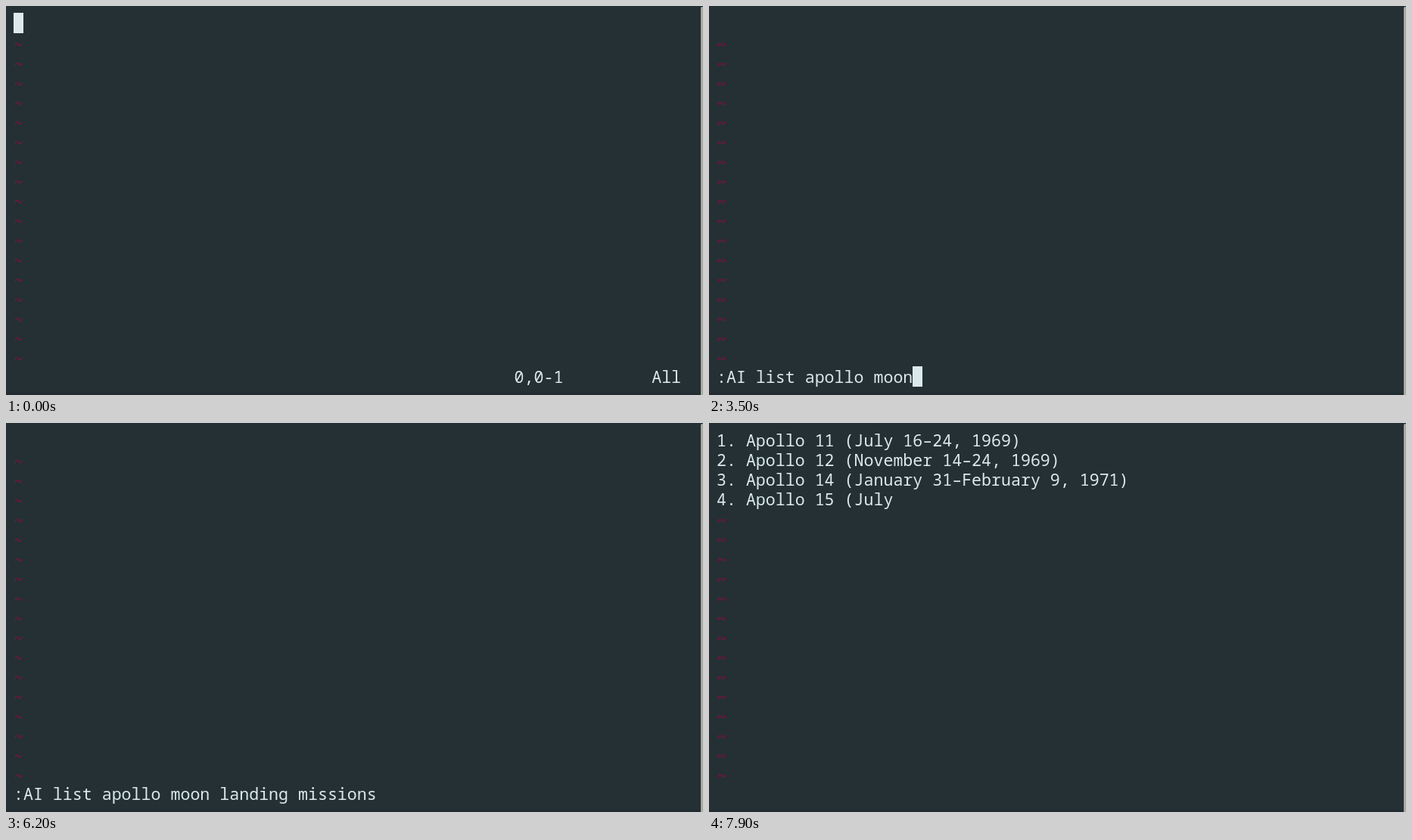
An HTML page that plays this animation: 921 by 515 pixels, repeating every 8 s.

```html
<!DOCTYPE html>
<html lang="en">
<head>
<meta charset="utf-8">
<title>Terminal editor</title>
<style>
  html, body { margin: 0; width: 100%; height: 100%; overflow: hidden; background: #243034; }
  #stage {
    position: absolute; left: 0; top: 0; width: 921px; height: 515px;
    overflow: hidden; background: #243034; color: #dbe9ef;
    font: 500 21.62px/28px "Noto Sans Mono", "DejaVu Sans Mono", monospace;
    font-variant-ligatures: none;
  }
  #stage div { position: absolute; white-space: pre; height: 26px; }
  #stage .tilde { color: #7c1241; line-height: 33px; }
  #stage #cursor { width: 13px; height: 27px; background: #dbe9ef; }
  #stage #edge { left: 0; top: 512px; width: 918px; height: 3px; background: #212b31; }
  #stage #bar { left: 918px; top: 1px; width: 4px; height: 514px; background: #aaa8a2; border-radius: 2px 0 0 0; }
</style>
</head>
<body>
<div id="stage"></div>
<script>
const LOOP = 8000, STEP = 100;
const LEFT = 10, TOP = 9, CELL = 12.972, LINE = 26, LAST = 18;

const command = ":AI list apollo moon landing missions";
const answer = [
  "1. Apollo 11 (July 16–24, 1969)",
  "2. Apollo 12 (November 14–24, 1969)",
  "3. Apollo 14 (January 31–February 9, 1971)",
  "4. Apollo 15 (July"
].join("\n");

// [time, visible characters]
const typing = [[2700, 1], [3500, 20], [3900, 27], [4000, 27], [4500, 37]];
const stream = [[6900, 0], [7500, 67], [7700, 110], [7900, 129]];
// the cursor toggles at each of these times, starting visible
const toggles = [100, 700, 1300, 1900, 2500, 2700, 5500, 5600, 6200, 6500, 6900];

const stage = document.getElementById("stage");

function add(id) {
  const el = document.createElement("div");
  if (id) el.id = id;
  return stage.appendChild(el);
}

function place(el, col, row) {
  el.style.left = LEFT + col * CELL + "px";
  el.style.top = TOP + row * LINE + "px";
  return el;
}

function setText(el, text) {
  if (el.textContent !== text) el.textContent = text;
}

function countAt(keys, t) {
  if (t < keys[0][0]) return 0;
  for (let i = 1; i < keys.length; i++) {
    const [t0, n0] = keys[i - 1], [t1, n1] = keys[i];
    if (t < t1) return Math.round(n0 + (n1 - n0) * (t - t0) / (t1 - t0));
  }
  return keys[keys.length - 1][1];
}

add("edge");
add("bar");
const rows = Array.from({ length: LAST + 1 }, (_, i) => place(add(), 0, i));
const ruler = [place(add(), 51, LAST), place(add(), 65, LAST)];
const cursor = add("cursor");

function draw(time) {
  const t = Math.floor((time % LOOP) / STEP) * STEP;
  const lines = answer.slice(0, countAt(stream, t)).split("\n");

  for (let i = 0; i < LAST; i++) {
    const empty = i > 0 && !lines[i];
    rows[i].className = empty ? "tilde" : "";
    setText(rows[i], empty ? "~" : lines[i]);
  }

  const typed = t < 6900 ? countAt(typing, t) : 0;
  setText(rows[LAST], command.slice(0, typed));
  setText(ruler[0], t < 2700 ? "0,0-1" : "");
  setText(ruler[1], t < 2700 ? "All" : "");

  const flips = toggles.filter(k => k <= t).length;
  cursor.style.visibility = flips % 2 ? "hidden" : "visible";
  if (typed) place(cursor, typed, LAST);
  else place(cursor, 0, 0);
}

const start = performance.now();
function tick() {
  draw(performance.now() - start);
  requestAnimationFrame(tick);
}
tick();
</script>
</body>
</html>
```
